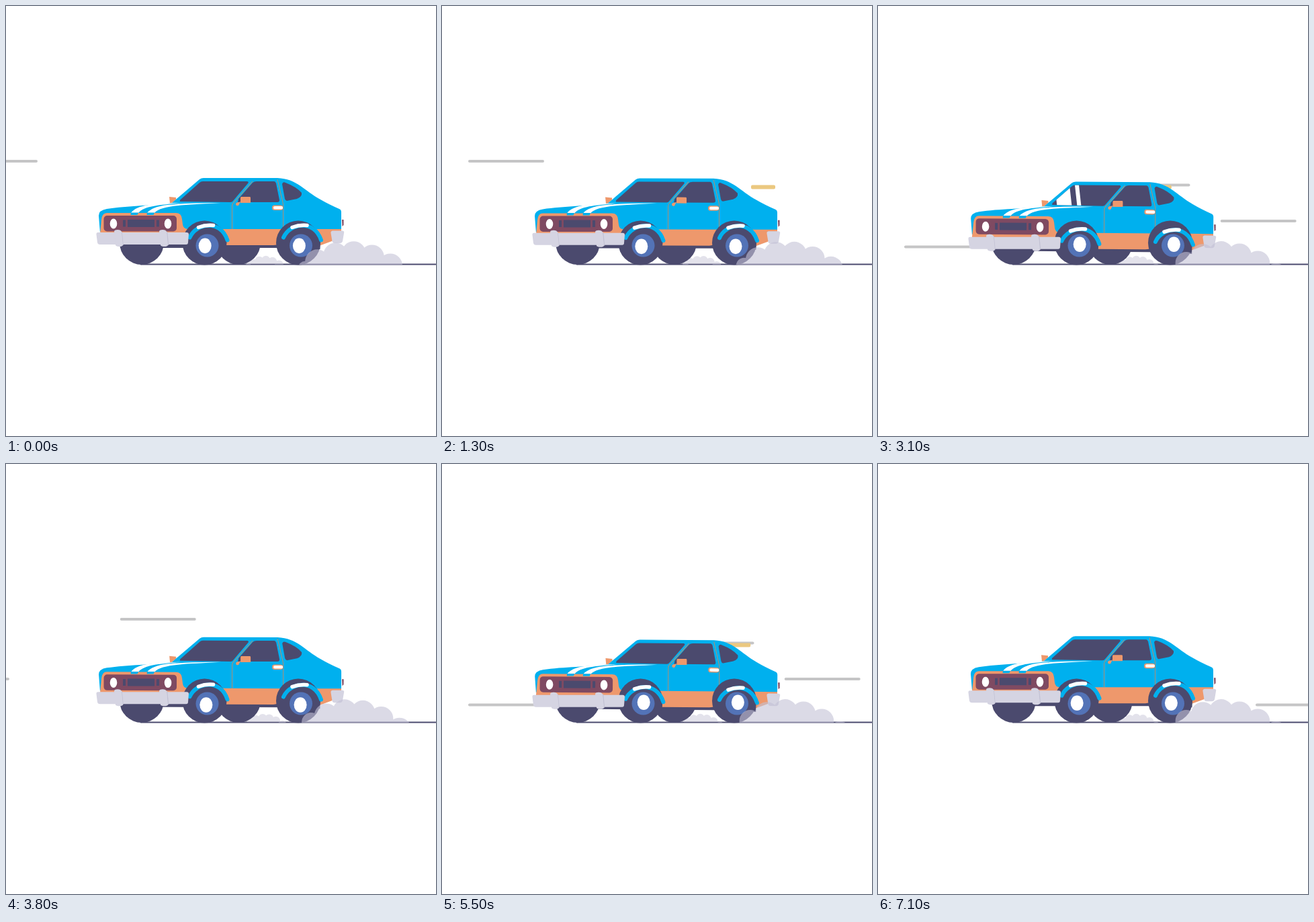
Write an HTML page that moves like this. It is 640 px wide and 640 px high and loops after 7.2 s.

```html
<!DOCTYPE html>
<html lang="en">
<head>
<meta charset="utf-8">
<title>Speeding car</title>
<style>
  html, body { margin: 0; width: 100%; height: 100%; overflow: hidden; background: #fff; }
  svg { display: block; width: 100vw; height: 100vh; }
  .blue { fill: #00b0ee; }
  .orange { fill: #ee986c; }
  .dark { fill: #4b4a6e; }
  .maroon { fill: #7f4a62; }
  .chrome { fill: #d5d4e2; }
  .white { fill: #fff; }
  .streak, .lip, .shine { fill: none; stroke-linecap: round; }
  .streak { stroke: #c5c5c6; stroke-width: 4; }
  .spark { fill: #ebc880; }
  .lip { stroke: #00b0ee; stroke-width: 6; }
  .shine { stroke: #fff; stroke-width: 5.5; }
  .seam { fill: none; stroke: #b58f73; stroke-width: 1; }
  .shade { fill: none; stroke: #c2c1d3; stroke-width: 1.5; }
  .smoke { fill: rgb(196, 194, 214); }
</style>
</head>
<body>
<svg viewBox="0 0 640 640">
  <defs>
    <clipPath id="aboveRoad"><rect y="300" width="640" height="85"/></clipPath>
    <path id="windshield" d="M259 291Q258 289 261 287L288 263Q290 261 293 261H359Q362 262 360 264L338 290Q337 292 334 292Z"/>
    <clipPath id="glass"><use href="#windshield"/></clipPath>
    <path id="arch" class="dark" d="M274 347C283 326 320 322 328 352V362H270Z"/>
    <g id="fender">
      <path class="lip" d="M273.500 344.500C283 323 319 317 329.500 348.500"/>
      <path class="shine" d="M286.500 329.500Q297 325.500 308.500 326.500"/>
    </g>
    <g id="wheel">
      <circle class="dark" cx="295.500" cy="352.500" r="33"/>
      <circle cx="299.500" cy="356.500" r="17" fill="#5373b7"/>
    </g>
    <path id="guard" d="M161 335Q162 333 166 333Q171 333 172 336L174 356Q173 358 169 358Q164 358 163 356Z"/>
  </defs>

  <g id="streaks"></g>
  <g id="sparks"></g>
  <path stroke="#4b4a6e" stroke-width="2" d="M200 384.500H640"/>
  <g clip-path="url(#aboveRoad)"><path id="farSmoke" class="smoke" opacity=".48" transform="translate(387 384) scale(.36) translate(-518 -384)"/></g>
  <circle class="dark" cx="202" cy="352" r="33"/>
  <circle class="dark" cx="346" cy="352" r="33"/>

  <g class="sway">
    <path class="dark" d="M200 345H430V360H200Z"/>
    <path class="orange" d="M243 284L253 285V288L246 294H244Z"/>
    <path class="blue" d="M140 337L138 312Q138 304 150 302C180 297.500 220 297 247 293L288 258Q290.500 256 294 256H404C433 257 444 275 468 288Q480 295 496 302Q499 303 499 307V333H142Z"/>
    <path class="orange" d="M139.500 345L142 318Q143 308 150 308H253Q261 308 262 317L263 325Q264 332 271 332H280L270 350H250V345Z"/>
    <path class="orange" d="M320 332H420L412 346Q408 356 398 356H326Z"/>
    <path class="orange" d="M460 332H499V338L485 350L466 357Z"/>
    <path class="white" d="M186 308Q192 299 213 296Q236 293 260 293C230 296 206 297 197 308Z"/>
    <path class="white" d="M210 308Q217 299 240 296Q275 292.500 320 293C270 296 231 296 221 308Z"/>
    <path class="blue" d="M186 307.500H197L195.500 311H185.500ZM210 307.500H221L219.500 311H209.500Z"/>
    <rect class="maroon" x="145.500" y="312" width="108.500" height="23.500" rx="5"/>
    <path class="dark" d="M181 318H221V329H181ZM174 318.500H178V328.500H174ZM224 318.500H228V328.500H224Z"/>
    <ellipse class="white" cx="160" cy="324" rx="5.300" ry="7.500"/>
    <ellipse class="white" cx="241" cy="324" rx="5.300" ry="7.500"/>
    <use href="#windshield" class="dark"/>
    <g clip-path="url(#glass)"><path id="glint" class="white" d="M-37 258H-15L-10 300H-32ZM-7 258H-1L4 300H-2Z"/></g>
    <path class="dark" d="M345 292L346 287L367 263Q369 261 373 261H399Q401 261 402 264L407 289Q407 292 404 292Z"/>
    <path class="dark" d="M411 265Q412 261 416 263Q432 269 440 278Q441 284 433 287L418 290Q416 290 415 287Z"/>
    <path class="seam" d="M367 261L340 291Q336.500 294 336.500 297V332M404 258L412 292Q412.500 294 412.500 297V332"/>
    <path class="orange" d="M350 284H363Q364 284 364 286V293H349V286Q349 284 350 284ZM349 291L346 297Q342 298 342 295Q342 292 347 292Z"/>
    <rect class="orange" x="396" y="296.500" width="16" height="7.500" rx="3.500"/>
    <rect class="white" x="398" y="298" width="14" height="4.500" rx="2"/>
    <path class="maroon" d="M500 318H502.500V326L500.500 328Z"/>
    <path class="chrome" d="M486 334.500H501Q504 335 503 338L501 350Q500 353 497 353H489Q486 353 485.500 350L483.500 338Q483 335 486 334.500Z"/>
    <use href="#arch"/>
    <use href="#arch" x="139.500"/>
  </g>

  <use href="#wheel"/>
  <use href="#wheel" x="139.500"/>
  <g id="hubs" class="white">
    <ellipse cx="298.500" cy="356.300" rx="9.500" ry="11.300"/>
    <ellipse cx="438.700" cy="356.300" rx="9.500" ry="11.300"/>
  </g>
  <g class="sway">
    <use href="#fender"/>
    <use href="#fender" x="139.500"/>
  </g>
  <g id="bumper">
    <path class="chrome" d="M137 337H269Q272 337 272 340L271 352Q271 355 268 355H140Q136.500 355 136 352L134.500 340Q134 337 137 337Z"/>
    <path class="shade" d="M172 336L174 356M239.500 336L241.500 356"/>
    <use href="#guard" class="chrome"/>
    <use href="#guard" class="chrome" x="67"/>
  </g>
  <g clip-path="url(#aboveRoad)"><path id="nearSmoke" class="smoke" opacity=".6"/></g>
</svg>

<script>
const LOOP = 7200, STEP = 100, ROAD = 384;
const $ = id => document.getElementById(id);
const set = (el, name, value) => el.setAttribute(name, value);
const clamp = (v, lo, hi) => Math.min(hi, Math.max(lo, v));

// Passing streaks: y and the moment each is fully in view
const streaks = [[231, 100], [266.5, 461], [320, 340], [358.5, 700]];
// Sparks: x, y and start time
const sparks = [[420, 269.5, 1110], [460, 301.5, 1848], [420, 269.5, 3058], [420, 269.5, 5402]];

function addAll(list, parent, tag, className) {
  return list.map(() => {
    const el = document.createElementNS("http://www.w3.org/2000/svg", tag);
    set(el, "class", className);
    return $(parent).appendChild(el);
  });
}
const streakEls = addAll(streaks, "streaks", "path", "streak");
const sparkEls = addAll(sparks, "sparks", "rect", "spark");

// A row of puffs that drifts right, swelling and sinking back into the road
function smokePath(t) {
  let d = "";
  for (let s = t % 400 / 400; s < 6; s++) {
    const height = 34 - 3.8 * (s - 2.8) ** 2;
    if (height <= 0) continue;
    const r = Math.min(18, 10 + 8 * s);
    const x = 436 + 27.2 * s + 9 * Math.max(0, 1 - s);
    const y = ROAD - height + r, base = Math.max(y, ROAD + 1);
    d += `M${x - r} ${base}V${y}A${r} ${r} 0 0 1 ${x + r} ${y}V${base}Z`;
  }
  return d;
}

function draw(t) {
  const dip = (1 - Math.cos((t + 20) * Math.PI / 600)) / 2;
  document.querySelectorAll(".sway").forEach(el =>
    set(el, "transform", `translate(0 ${4.5 * dip}) rotate(${0.55 * dip} 140 336)`));
  set($("bumper"), "transform", `translate(0 ${7.4 * dip})`);

  const angle = (195 + 0.3 * t) * Math.PI / 180;
  set($("hubs"), "transform", `translate(${2.4 * Math.cos(angle)} ${-2.2 * Math.sin(angle)})`);

  streaks.forEach(([y, start], i) => {
    const u = (t - start + 1400) % 1200 - 200;
    const x = 41 + u * (u < 0 ? 1.05 : 1.3075);
    set(streakEls[i], "d", `M${x} ${y}h109`);
  });

  sparks.forEach(([x, y, start], i) => {
    const travel = 0.4 * (t - start);
    const head = clamp(travel, 0, 84), tail = clamp(travel - 36, 0, 84);
    const el = sparkEls[i];
    set(el, "x", x + tail);
    set(el, "y", y - 3);
    set(el, "width", head - tail);
    set(el, "height", 6);
    set(el, "rx", 2);
  });

  set($("glint"), "transform", `translate(${299 + (t - 3100) * 0.5} 0)`);
  const smoke = smokePath(t);
  set($("nearSmoke"), "d", smoke);
  set($("farSmoke"), "d", smoke);
}

const begin = performance.now();
function tick() {
  const t = (performance.now() - begin) % LOOP;
  draw(Math.floor(t / STEP) * STEP);
  requestAnimationFrame(tick);
}
tick();
</script>
</body>
</html>
```
